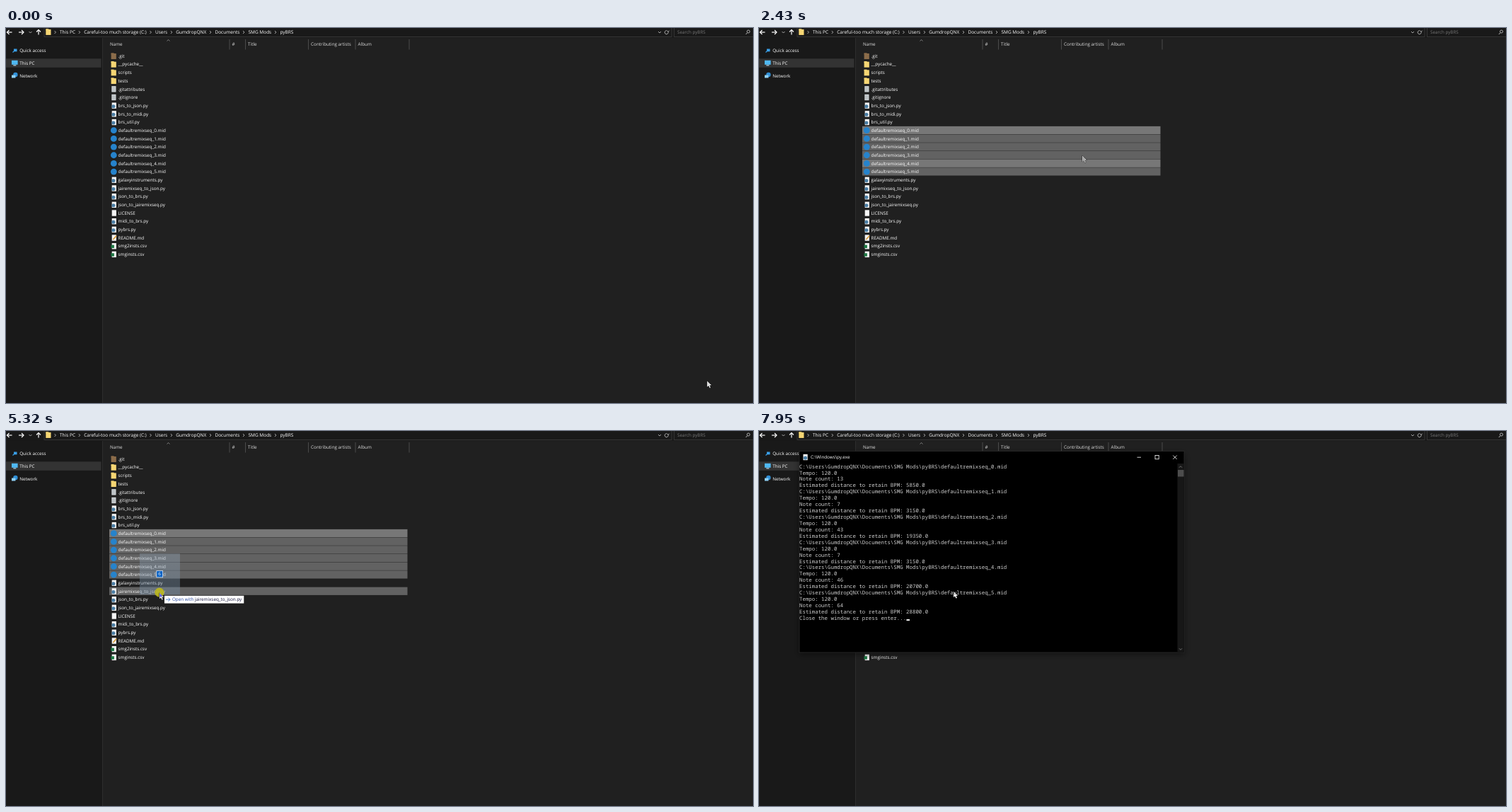
An HTML page with a canvas that plays this animation: 1056x530 px, repeating every 8 s.

```html
<!DOCTYPE html>
<html lang="en">
<head>
<meta charset="utf-8">
<title>File explorer drag and drop</title>
<style>
html, body { margin: 0; width: 100%; height: 100%; overflow: hidden; background: #191919; }
canvas { display: block; }
</style>
</head>
<body>
<canvas id="stage" width="1056" height="530"></canvas>
<script>
const c = document.getElementById('stage').getContext('2d');
const LOOP = 8000, ROW = 11.68, TOP = 33.75, LEFT = 146, RIGHT = 567.5;
const sans = size => `${size}px "Open Sans", "Noto Sans", sans-serif`;
const UI = sans(6.3), CRUMB = sans(6.5);
const MONO = '7.425px "Noto Sans Mono", "DejaVu Sans Mono", monospace';
const USER = 'GumdropQNX';

// Moments of the story, in ms
const SELECT = 1030, SELECTED = 2360, GRAB = 3840, DRAG = 4740, DROP = 6060, OPEN = 6200, PRINT = 6740;

const mids = [0, 1, 2, 3, 4, 5].map(n => `defaultremixseq_${n}.mid`);
const files = ['.git', '__pycache__', 'scripts', 'tests', '.gitattributes', '.gitignore',
  'brs_to_json.py', 'brs_to_midi.py', 'brs_util.py', ...mids,
  'galaxyinstruments.py', 'jairemixseq_to_json.py', 'json_to_brs.py', 'json_to_jairemixseq.py',
  'LICENSE', 'midi_to_brs.py', 'pybrs.py', 'README.md', 'smg2insts.csv', 'smginsts.csv'];
const FIRST = files.indexOf(mids[0]), LAST = FIRST + mids.length - 1;

const output = [13, 7, 43, 7, 46, 64].flatMap((count, n) => [
  `C:\\Users\\${USER}\\Documents\\SMG Mods\\pyBRS\\${mids[n]}`,
  'Tempo: 120.0',
  `Note count: ${count}`,
  `Estimated distance to retain BPM: ${count * 450}.0`
]).concat('Close the window or press enter...');

// Pointer moves: begin, end, x, y reached; it rests in between
const moves = [
  [0, 490, 588, 142],
  [SELECT, 1640, 535, 184], [1640, 2170, 475, 207],
  [2300, 2430, 457.5, 180], [2430, 2900, 262, 134], [2900, 3110, 236.5, 142.5],
  [4700, 4900, 260, 147], [5050, 5320, 217, 228], [5320, 5600, 203, 276],
  [6940, 7070, 203, 268], [7330, 7470, 214, 261], [7670, 7950, 275, 226]];

const clamp = k => Math.min(1, Math.max(0, k));
const rowAt = y => Math.floor((y - TOP) / ROW);

function pointer(t) {
  let x = 992, y = 499;
  for (const [from, to, nx, ny] of moves) {
    const k = clamp((t - from) / (to - from));
    x += (nx - x) * k;
    y += (ny - y) * k;
  }
  return { x, y };
}

function rect(x, y, w, h, color) {
  c.fillStyle = color;
  c.fillRect(x, y, w, h);
}
function disc(x, y, r, color) {
  c.fillStyle = color;
  c.beginPath();
  c.arc(x, y, r, 0, 7);
  c.fill();
}
function arc(x, y, r, from, to) {
  c.strokeStyle = '#ccc';
  c.lineWidth = 0.8;
  c.beginPath();
  c.arc(x, y, r, from, to);
  c.stroke();
}
function frame(x, y, w, h, color) {
  c.strokeStyle = color;
  c.lineWidth = 0.8;
  c.strokeRect(x, y, w, h);
}
// Draws text centred on y and returns its width
function text(s, x, y, color = '#fff', font = UI) {
  c.font = font;
  c.fillStyle = color;
  c.fillText(s, x, y + 2.2);
  return c.measureText(s).width;
}
function line(color, width, ...pts) {
  c.strokeStyle = color;
  c.lineWidth = width;
  c.beginPath();
  for (let i = 0; i < pts.length; i += 2) c.lineTo(pts[i], pts[i + 1]);
  c.stroke();
}
// Open arrowhead with its tip at (x, y), facing along (dx, dy)
function head(x, y, dx, dy, size = 2, color = '#ccc', width = 0.8) {
  const bx = x - dx * size, by = y - dy * size;
  line(color, width, bx - dy * size, by - dx * size, x, y, bx + dy * size, by + dx * size);
}
function arrow(x, y, dx, dy, size = 3.5, color = '#fff', width = 1.2) {
  const tx = x + dx * size, ty = y + dy * size;
  line(color, width, x - dx * size, y - dy * size, tx, ty);
  head(tx, ty, dx, dy, size * 0.85, color, width);
}
function folder(x, y, color = '#f6d673') {
  rect(x - 3.7, y - 4.3, 4, 2, color);
  rect(x - 3.7, y - 3.6, 7.2, 8, color);
}
function page(x, y, color = '#f4f4f4') {
  rect(x - 3, y - 4.2, 6.2, 8.4, color);
}

function fileIcon(name, i, y) {
  const x = 152.3;
  if (i < 4) return folder(x, y, i ? undefined : '#8b6c4a');
  if (name.endsWith('.mid')) return disc(x, y, 4.4, '#2683cc');
  if (name.startsWith('.git')) {
    page(x, y, '#cdd2d5');
    for (let k = -2; k < 3; k += 2) line('#8d9499', 0.5, x - 2, y + k, x + 2, y + k);
    return;
  }
  page(x + 0.4, y);
  if (name.endsWith('.py')) disc(x - 0.4, y + 1, 2.5, '#4b7fa6');
  if (name.endsWith('.csv')) rect(x - 3.8, y - 1.6, 4.4, 4.4, '#1e7a45');
  if (name.endsWith('.md')) line('#d99a35', 1.6, x - 1, y + 2.5, x + 4, y - 3);
}

function drawToolbar() {
  rect(0, 0, 1056, 13.5, '#191919');
  frame(54, -1, 887, 13.5, '#3d3d3d');
  frame(944.5, -1, 120, 13.5, '#3d3d3d');
  arrow(5, 6, -1, 0);
  arrow(21.5, 6, 1, 0);
  head(34.5, 7, 0, 1);
  arrow(46, 6, 0, -1);
  folder(60, 5.5);
  let x = 76;
  for (const s of ['This PC', 'Careful-too much storage (C:)', 'Users', USER, 'Documents', 'SMG Mods', 'pyBRS']) {
    head(x - 5.5, 6, 1, 0);
    x += text(s, x, 6, '#fff', CRUMB) + 12.2;
  }
  head(924, 7, 0, 1);
  arc(933.7, 6.2, 2.5, -0.6, 4.9);
  head(936.2, 5.2, 0, 1, 1.5);
  text('Search pyBRS', 949, 6, '#777');
  arc(1049.5, 5, 2, 0, 7);
  line('#ccc', 0.9, 1048, 6.7, 1045.8, 9);
}

function drawSidebar() {
  rect(0, 43.3, 134.5, 12.5, '#333');
  line('#2d2d2d', 1, 136.5, 14, 136.5, 530);
  line('#3aa0e8', 1.1, 9.5, 34.5, 12, 32);
  rect(11, 29.5, 4.5, 3.8, '#3aa0e8');
  rect(8, 45.8, 8.6, 6, '#4fb8f2');
  rect(10.3, 52.2, 4, 1.2, '#b8d8e8');
  disc(13.4, 66, 3.2, '#2f8fd6');
  rect(8, 66.5, 5.4, 4, '#8fd0f5');
  ['Quick access', 'This PC', 'Network'].forEach((s, i) => text(s, 19.2, 31.6 + 17.9 * i));
}

function drawHeader() {
  const edges = [316, 338.5, 427.5, 494, 570];
  const titles = ['#', 'Title', 'Contributing artists', 'Album', ''];
  text('Name', 147, 23.2, '#dedede');
  head(229.5, 16.5, 0, -1, 2, '#999');
  edges.forEach((x, i) => {
    line('#4a4a4a', 1, x, 16, x, 30.5);
    text(titles[i], x + 3.6, 23.2, '#dedede');
  });
}

function drawRows(t, p) {
  const selecting = t >= SELECT && t < SELECTED;
  const dragging = t >= DRAG && t < DROP;
  const seen = dragging ? p : pointer(t - 70); // plain hover trails the pointer
  const under = seen.x > LEFT && seen.x < RIGHT && !selecting && t < DROP ? rowAt(seen.y) : -1;
  const last = selecting ? Math.min(LAST, rowAt(p.y)) : LAST;
  const picked = t >= SELECTED || (selecting && p.x < RIGHT);
  files.forEach((name, i) => {
    const y = TOP + ROW * i, mid = y + ROW / 2;
    const selected = picked && i >= FIRST && i <= last;
    const hover = i === under;
    let color;
    if (selected) color = t >= OPEN ? '#333' : i === FIRST || (hover && !dragging) ? '#777' : '#626262';
    else if (hover) color = dragging ? '#626262' : '#4d4d4d';
    if (color) rect(LEFT, y, RIGHT - LEFT, ROW - 0.4, color);
    fileIcon(name, i, mid);
    text(name, 158.6, mid);
  });
  if (selecting) {
    const start = pointer(SELECT);
    const box = [p.x, start.y, start.x - p.x, p.y - start.y];
    rect(...box, 'rgba(0,100,200,.36)');
    frame(...box, '#1c6bb4');
  }
  if (dragging) drawDrag(p, files[under]);
}

function drawDrag({ x, y }, name) {
  const shade = c.createLinearGradient(0, y - 55, 0, y + 3);
  shade.addColorStop(0, 'rgba(150,170,190,.34)');
  shade.addColorStop(1, 'rgba(110,135,160,.42)');
  rect(x - 28, y - 55, 57, 58, shade);
  rect(x - 4.5, y - 31, 9.5, 10, '#e8f0fa');
  rect(x - 3.8, y - 30.3, 8.1, 8.6, '#0a62c4');
  text(mids.length, x - 1.6, y - 26);
  if (!name || !name.endsWith('.py')) return;
  c.font = UI;
  const lead = c.measureText('Open with ').width;
  const lx = x + 7, ly = y + 10;
  rect(lx, ly - 5.4, 14 + lead + c.measureText(name).width, 10.8, '#fff');
  arrow(lx + 5, ly, 1, 0, 3, '#2a62c0', 0.8);
  text('Open with', lx + 11, ly, '#2747a0');
  text(name, lx + 11 + lead, ly, '#14143c');
}

function drawConsole(t) {
  if (t < OPEN) return;
  const ease = 1 - (1 - clamp((t - 6165) / 305)) ** 2;
  const scale = 0.96 + 0.04 * ease;
  c.save();
  c.globalAlpha = ease;
  c.translate(329, 170.5);
  c.scale(scale, scale);
  c.translate(-329, -170.5);
  c.shadowColor = 'rgba(0,0,0,.5)';
  c.shadowBlur = 9;
  c.shadowOffsetY = 3;
  rect(57, 28.5, 544, 284.5, '#000');
  c.shadowColor = 'transparent';
  frame(57, 28.5, 544, 284.5, '#2b2b2b');
  page(65.5, 37);
  disc(65.5, 38, 2.6, '#4b7fa6');
  text('C:\\Windows\\py.exe', 73, 37.2);
  line('#fff', 0.8, 534.5, 37.2, 540, 37.2);
  frame(560, 34.5, 5.2, 5.2, '#fff');
  line('#fff', 0.8, 585.3, 34.5, 590.7, 39.9);
  line('#fff', 0.8, 590.7, 34.5, 585.3, 39.9);
  rect(591.5, 46, 9, 266.5, '#171717');
  rect(592, 55, 8.5, 9.5, '#4d4d4d');
  head(596, 49.7, 0, -1, 2, '#888');
  head(596, 309.3, 0, 1, 2, '#888');

  // Five lines per step
  const shown = Math.min(output.length, 5 * Math.max(0, Math.floor((t - PRINT) / 66 + 1)));
  const mid = i => 50.4 + 8.93 * i;
  for (let i = 0; i < shown; i++) text(output[i], 57, mid(i), '#ccc', MONO);
  if (Math.floor((t - 6340) / 530) % 2) {
    const done = shown === output.length;
    const x = done ? 57 + output[shown - 1].length * 4.455 : 57;
    rect(x, mid(done ? shown - 1 : shown) + 1.4, 4.5, 2, '#fff');
  }
  c.restore();
}

const cursor = new Path2D('M0 0V8.4L2 6.6L3.5 9.8L4.9 9.2L3.5 6.1H6.1Z');

function drawPointer(t, { x, y }) {
  const pressed = (t >= SELECT && t < SELECTED) || (t >= GRAB && t < DROP);
  if (pressed) disc(x, y, 6.6, 'rgba(190,185,25,.88)');
  c.save();
  c.translate(x, y + 0.7);
  c.strokeStyle = '#000';
  c.lineWidth = 0.7;
  c.stroke(cursor);
  c.globalCompositeOperation = 'difference'; // the pointer inverts what lies below
  c.fillStyle = '#fff';
  c.fill(cursor);
  c.restore();
}

function draw(now) {
  const t = now % LOOP, p = pointer(t);
  c.textRendering = 'geometricPrecision';
  rect(0, 0, 1056, 530, '#191919');
  rect(137, 13.5, 919, 516.5, '#202020');
  drawToolbar();
  drawSidebar();
  drawHeader();
  drawRows(t, p);
  drawConsole(t);
  drawPointer(t, p);
  requestAnimationFrame(draw);
}
requestAnimationFrame(draw);
</script>
</body>
</html>
```
